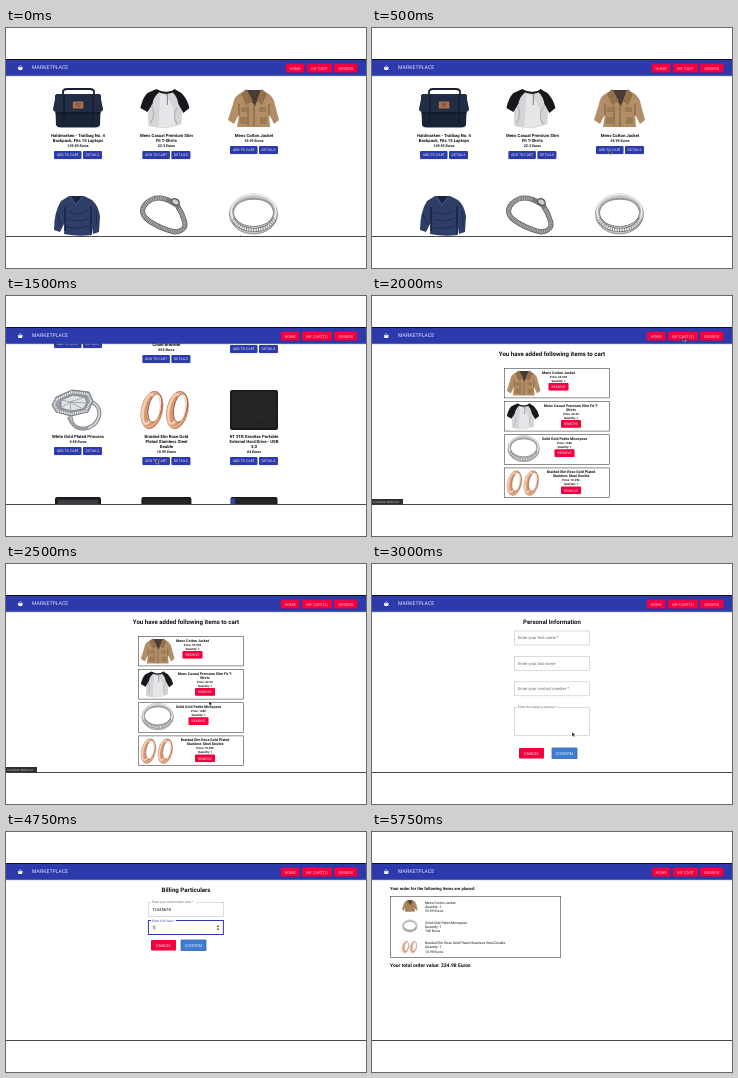
Animation, 360 px wide and 240 px high, one loop 6 s. Source, as an HTML page:

```html
<!DOCTYPE html>
<html lang="en">
<head>
<meta charset="utf-8">
<title>Marketplace</title>
<style>
  html, body { margin: 0; width: 100%; height: 100%; overflow: hidden; background: #fff; }
  svg { display: block; width: 100%; height: 100%; }
  text { font-family: Roboto, Arial, sans-serif; text-rendering: geometricPrecision; }
</style>
</head>
<body>
<svg id="stage" viewBox="0 0 360 240"></svg>
<script>
const INDIGO = '#2d3aac', RED = '#f5003f', BLUE = '#3f7dd0', AUTOFILL = '#e3ebfc', GRAY = '#c4c4c4';
const STEP = 250;

// ---- drawing helpers ----
const rect = (x, y, w, h, fill, extra = '') =>
  `<rect x="${x}" y="${y}" width="${w}" height="${h}" fill="${fill}" ${extra}/>`;
const path = (d, fill, stroke = 'none', width = .6) =>
  `<path d="${d}" fill="${fill}" stroke="${stroke}" stroke-width="${width}"/>`;
const ellipse = (x, y, rx, ry, stroke, width, turn = 0, fill = 'none') =>
  `<ellipse cx="${x}" cy="${y}" rx="${rx}" ry="${ry}" fill="${fill}" stroke="${stroke}" stroke-width="${width}" transform="rotate(${turn} ${x} ${y})"/>`;
const dashed = (dashes, shape) => `<g stroke-dasharray="${dashes}">${shape}</g>`;
const frameBox = (x, y, w, h, color, width = .6, fill = 'none') =>
  rect(x, y, w, h, fill, `stroke="${color}" stroke-width="${width}"`);

// y is the vertical middle of the capitals
function text(s, x, y, size, { weight = 400, color = '#111', anchor = 'start', extra = '' } = {}) {
  return `<text x="${x}" y="${y + size * .355}" font-size="${size}" font-weight="${weight}" fill="${color}" text-anchor="${anchor}" ${extra}>${s}</text>`;
}
const bold = (s, x, y, size, anchor = 'start', extra = '') =>
  text(s, x, y, size, { weight: 700, anchor, extra });
function button(s, x, y, w, h, fill, size, color = '#e4e4f6') {
  return rect(x, y + .4, w, h, '#0002', 'rx="1"') + rect(x, y, w, h, fill, 'rx="1"') +
    text(s, x + w / 2, y + h / 2, size, { color, anchor: 'middle' });
}

// ---- product pictures: x centred on 0, y from 0 to 40 ----
const drive = (w, accent = '') => rect(-w / 2, 0, w, 40, '#17181a', 'rx="2"') +
  rect(-w / 2 + 1.5, 1.5, w - 3, 36, '#232426', 'rx="1.5"') + accent;
const hoop = (x, turn) => ellipse(x, 20, 10.5, 19, '#a8633f', .6, turn, '#d9976f') +
  ellipse(x - 3, 19, 5.5, 15, '#f3d3bd', 2.4, turn) +
  ellipse(x + 3, 18, 6.5, 14.5, '#8f4f30', .8, turn, '#fff') +
  ellipse(x - 1, 20, 9, 17.5, '#f0c3a5', .9, turn);

const art = {
  backpack: () => path('M-15 6V2Q-14 0-11 0H12Q15 0 16 2V6', 'none', '#18202f', 1.8) +
    path('M-23 6H23L22 36Q21 38.5 17 38.5H-17Q-21 38.5-22 36Z', '#1a2437') +
    path('M-22 5H22L25 20Q25 23 21 23H-21Q-25 23-25 20Z', '#212d44') +
    path('M-14 6V34M15 6V34', 'none', '#141c2c', 1.4) +
    path('M-23 24H23', 'none', '#0e1523', 1.2) +
    rect(-5.2, 12.5, 10.6, 7, '#a9704a', 'rx=".5"') + path('M-3 15H3M-2 17H2', 'none', '#5b3823', .7),
  shirt: () => path('M-12 1Q0 4 10 1L16 9 15 35Q0 42-18 37L-19 9Z', '#d4d5d7') +
    path('M-6 5Q8 8 9 36Q4 39-8 38Z', '#e6e6e8') +
    path('M-10 0L-19 4Q-24 9-26 19L-19 23-14 15Q-13 8-7 3ZM8 0L15 4Q21 10 23 19L17 24 12 15Q11 8 6 3Z', '#17181b') +
    path('M-10 1Q0 7 9 1', 'none', '#17181b', 2) + path('M1 5V16', 'none', '#77787b', .9) +
    path('M-15 16Q-10 26-16 34M11 18Q5 28 11 35', 'none', '#b2b3b7', 1.2),
  jacket: () => path('M-8 1L8 1 15 5Q20 9 21 16L25 31 20 35 15 25 16 38-17 38-15 25-20 35-26 31-21 15Q-20 8-15 5Z', '#b18e67') +
    path('M-7 1H7L3 12 1 17-3 12Z', '#493b35') +
    path('M-8 0L-1 12-8 16-13 5ZM8 0L3 12 8 16 13 5Z', '#927049') +
    path('M-15 15L-15 27M15 15L15 27M0 14V38M-6 17V37', 'none', '#79593a', .9) +
    rect(-13, 18, 6, 5, '#9c7a52') + rect(5, 18, 7, 5, '#9c7a52') +
    rect(-14, 28, 7, 7, '#9c7a52') + rect(6, 28, 7, 7, '#9c7a52'),
  sweater: () => path('M-9 0L6 0 14 4Q20 9 22 20L21 36 15 38 13 25 14 39Q0 41-14 38L-13 26-18 36-24 34Q-24 16-17 5Z', '#2d3f66') +
    path('M-7 0L-2 8 4 0Z', '#18233f') + path('M-8 0L-2 9 5 0', 'none', '#3d5280', 1.2) +
    path('M-13 11V35M13 10V37', 'none', '#18233f', 1.6) +
    path('M-10 16Q0 20 10 15M-10 23Q1 27 11 22M-11 31Q0 34 11 30M-21 18L-17 28M18 14L19 30', 'none', '#202f52', 1.2),
  bracelet: () => {
    const chain = 'M7 7Q-9-3-20 7Q-30 18-14 27Q-2 34 9 36Q21 34 18 25Q16 17 11 10';
    return path(chain, 'none', '#57595c', 5) + path(chain, 'none', '#b3b4b6', 3.4) +
      dashed('.8 1', path(chain, 'none', '#6c6e71', 3.4)) +
      path('M0 3L13 11', 'none', '#77797c', 4.5) + ellipse(9, 6, 4, 3, '#55575a', 1.4, 30, '#ccc');
  },
  band: () => ellipse(-.5, 18, 24, 20, '#85878a', .8, 0, '#c3c4c6') +
    ellipse(-.5, 15.5, 22.5, 17, '#f0f0f1', 1.4) +
    ellipse(-.5, 16.5, 20, 14, '#77797c', .9, 0, '#fff') +
    path('M-21 16Q-18 3 0 3Q18 3 20 16', 'none', '#96989b', 1.6) +
    path('M-22 22Q-15 34 0 34Q15 34 21 22', 'none', '#77797c', 4.2) +
    dashed('1.6 .8', path('M-22 22Q-15 34 0 34Q15 34 21 22', 'none', '#efeff0', 2.6)),
  diamond: () => ellipse(7, 25, 15, 13, '#8a8d92', 4, -35) + ellipse(7, 25, 15, 13, '#d2d4d8', 1.8, -35) +
    path('M-10 27Q-4 42 10 38', 'none', '#9a9da2', 2.4) +
    path('M-22 7L-6 0 11 2 15 11 10 22-7 26-22 22-26 15Z', '#9a9da3', '#70747a', .9) +
    dashed('1.2 1', path('M-21 9L-6 2 10 4 13 11 8 21-7 24-20 21-24 15Z', 'none', '#eef0f2', 2)) +
    path('M-17 10L-5 5 7 7 9 13 5 19-7 21-17 18Z', '#dfe2e6', '#7b7f86', .9) +
    path('M-17 10L-8 12 7 7M-8 12L-7 21M-8 12L9 13M-17 18L-8 12L5 19', 'none', '#92969d', .8),
  rose: () => hoop(-14.5, 12) + hoop(11, 12),
  slab: () => drive(48, path('M-22 31L22 25', 'none', '#2e2f31', .7)),
  ssd: () => drive(46, rect(-20, 3, 40, 34, '#3b3c3f')),
  black: () => drive(50),
  console: () => drive(47, path('M-23 2L-19 1V39H-23Z', '#2b48b8')),
};
const picture = (name, x, y, scale = 1) =>
  `<g transform="translate(${x} ${y}) scale(${scale})">${art[name]()}</g>`;

// ---- data ----
const ROSE = 'Braided Elm Rose Gold Plated';
const products = [
  ['backpack', '109.95', 'Haldmarken - Trailbag No. 4', 'Backpack, Fits 15 Laptops'],
  ['shirt', '22.3', 'Mens Casual Premium Slim', 'Fit T-Shirts'],
  ['jacket', '55.99', 'Mens Cotton Jacket'],
  ['sweater', '15.99', 'Mens Casual Slim Fit'],
  ['bracelet', '695', 'Womens Classic Series', 'Gold &amp; Silver Woven', 'Station Long', 'Chain Bracelet'],
  ['band', '168', 'Solid Gold Petite', 'Micropave'],
  ['diamond', '9.99', 'White Gold Plated Princess'],
  ['rose', '10.99', 'Braided Elm Rose Gold', 'Plated Stainless Steel', 'Double'],
  ['slab', '64', 'KT 2TB Granites Portable', 'External Hard Drive - USB', '3.0'],
  ['ssd', '109', 'Portable Drive 1TB'],
  ['black', '109', 'Solid State Drive 256GB'],
  ['console', '114', 'Gaming Drive 4TB'],
];
const cartItems = [
  ['jacket', '55.99', 186.5, 'Mens Cotton Jacket'],
  ['shirt', '22.3', 199, 'Mens Casual Premium Slim Fit T-', 'Shirts'],
  ['band', '168', 192.5, 'Solid Gold Petite Micropave'],
  ['rose', '10.99', 199, ROSE, 'Stainless Steel Double'],
];
const withoutShirt = cartItems.filter(([name]) => name !== 'shirt');

// ---- pages ----
function shop(scroll) {
  return products.map(([name, price, ...lines], i) => {
    const x = [72, 160.4, 248][i % 3];
    const top = 62 + Math.floor(i / 3) * 107 - scroll;
    if (top > 210 || top < -80) return '';
    const y = top + 45 + (lines.length - 1) * 5;
    return picture(name, x, top - 1) +
      lines.map((s, n) => bold(s, x, top + 45 + n * 5, 4.27, 'middle')).join('') +
      bold(price + ' Euros', x, y + 5.8, 3.7, 'middle', 'font-style="italic"') +
      button('ADD TO CART', x - 24, y + 11, 27.5, 8, INDIGO, 3.6) +
      button('DETAILS', x + 5, y + 11, 19, 8, INDIGO, 3.6);
  }).join('');
}

function cart(items) {
  return bold('You have added following items to cart', 180, 58, 6.1, 'middle') +
    items.map(([name, price, x, ...lines], i) => {
      const top = 72.3 + i * 33.2, y = top + lines.length * 4;
      return frameBox(132.3, top, 105, 29.6, '#444') + picture(name, 152, top + 2, .66) +
        lines.map((s, n) => bold(s, x, top + 4 + n * 4, 3.65, 'middle')).join('') +
        bold(`Price: ${price}€`, x, y + 4.3, 2.9, 'middle') +
        bold('Quantity: 1', x, y + 8.5, 2.9, 'middle') +
        button('REMOVE', x - 10, y + 10.6, 20, 7.6, RED, 3.5);
    }).join('');
}

// Outlined field: the label sits on the border once the field is filled or focused
function field(label, value, y, { focus, error, auto } = {}) {
  const border = error ? '#e0263c' : focus ? INDIGO : GRAY;
  const raised = value || focus;
  return frameBox(142.4, y, 75, 14, border, focus || error ? 1 : .6, auto ? AUTOFILL : '#fff') +
    (raised ? rect(145, y - 1, label.length * 1.5 + 1, 2, '#fff') : '') +
    text(label, 146, raised ? y : y + 7, raised ? 3.1 : 4.1, { color: focus ? INDIGO : '#666' }) +
    text(value, 146, y + 7, 4.2) +
    (focus && !auto ? rect(146.4 + value.length * 2.35, y + 4.6, .4, 5, '#111') : '');
}
const actions = (x, gap, y) => button('CANCEL', x, y, 25, 10.4, RED, 4) +
  button('CONFIRM', x + gap, y, 25, 10.4, BLUE, 4) +
  frameBox(x + gap, y, 25, 10.4, '#2b5ea8', .7);

function details(stage) {
  const filled = stage >= 2, phone = ['', '', '', '1234', '12345678'][stage];
  const name = ['', 'Lav', 'Lavani Teron'][Math.min(stage, 2)];
  return field('Enter your first name *', name, 67, { focus: stage === 1 || stage === 2, auto: filled }) +
    bold('Personal Information', 180, 58, 6.1, 'middle') +
    field('Enter your last name', '', 92.5) +
    field('Enter your contact number *', phone, 117.8, { error: stage === 2, focus: stage === 3 }) +
    frameBox(142.4, 143.3, 75, 28, GRAY) + rect(145, 142, 40, 3, '#fff') +
    text('Enter the shipping address *', 146, 143.3, 3.1, { color: '#666' }) +
    (filled ? rect(145.5, 148, 69, 19, AUTOFILL) + text('Velmarek', 146, 150.5, 4) + text('4', 146, 155, 4) : '') +
    actions(147, 33, 184);
}

function billing(filled) {
  return bold('Billing Particulars', 180, 58, 6.1, 'middle') +
    field('Enter your card number here *', filled ? '12345678' : '', 70.3, { focus: !filled }) +
    field('Enter CVV here *', filled ? '1' : '', 88.5, { focus: filled }) +
    (filled ? path('M210.5 95L212 93 213.5 95ZM210.5 96.4L212 98.4 213.5 96.4Z', '#555') : '') +
    actions(145, 30, 108);
}

function order() {
  const names = ['Mens Cotton Jacket', 'Solid Gold Petite Micropave', ROSE + ' Stainless Steel Double'];
  return bold('Your order for the following items are placed:', 18, 57, 4.2) +
    frameBox(18.3, 64.6, 170.4, 61, '#444') +
    withoutShirt.map(([name, price], i) => {
      const y = 70.3 + i * 20.4;
      return picture(name, 38, y - 2.3, .31) +
        [names[i], 'Quantity: 1', price + ' Euros'].map((s, n) => text(s, 53, y + n * 4.1, 3.45)).join('');
    }).join('') +
    bold('Your total order value: 234.98 Euros', 18, 133.3, 5);
}

function header(count) {
  const wide = count ? 5 : 0;
  const link = (s, x, w) => button(s, x, 35.8, w, 8.8, RED, 4, '#ffb9c6');
  return rect(0, 47.5, 360, 1.2, '#0002') + rect(0, 31, 360, 16.8, INDIGO) + rect(0, 31, 360, 1, '#111') +
    path('M11.8 39.2H16.8L16 42H12.6Z', '#fff') + path('M12.8 39.2L14.3 37.3 15.8 39.2', 'none', '#fff', .5) +
    text('MARKETPLACE', 26, 39.6, 5.2, { color: '#dfe2f6' }) +
    link('HOME', 279.8 - wide, 18.6) +
    link(count ? `MY CART(${count})` : 'MY CART', 301 - wide, 25 + wide) +
    link('ORDERS', 328, 23.4);
}
const footer = link => rect(0, 208.8, 360, 32, '#fff') + rect(0, 208, 360, 1, '#4a4a4a') +
  (link ? rect(0, 203, 31, 5.6, '#2f3033') + text('localhost:3000/' + link, 1.5, 205.8, 2.9, { color: '#ccc' }) : '');
const pointer = (x, y) => `<g transform="translate(${x} ${y})">` +
  path('M0 0V4.4L1.1 3.5 1.8 5 2.6 4.6 1.9 3.2 3.2 3.1Z', '#111', '#fff', .35) + '</g>';

// ---- timeline: page, cursor x, cursor y, cart count, hovered link ----
const at = (page, x, y, count = 0, link = '') => ({ page, x, y, count, link });
const top0 = () => shop(0), row3 = () => shop(181), full = () => cart(cartItems);
const timeline = [
  at(top0, 234, 207), at(top0, 236, 165), at(top0, 237, 122),
  at(top0, 148, 126, 1), at(top0, 148, 126, 2), at(() => shop(107), 237, 126, 2),
  at(row3, 150, 163.5, 3), at(row3, 311, 41, 4, 'cart'),
  at(full, 311, 41, 4, 'cart'), at(full, 260, 90, 4, 'cart'), at(full, 203, 137, 4, 'cart'),
  at(() => cart(withoutShirt), 200, 128, 3),
  at(() => details(0), 200, 168, 3), at(() => details(0), 186, 77, 3), at(() => details(1), 186, 77, 3),
  at(() => details(2), 191, 186, 3), at(() => details(3), 186, 126, 3), at(() => details(4), 191, 188, 3),
  at(() => billing(false), 191, 188, 3), at(() => billing(true), null, 0, 3),
  at(order, 189, 113), at(order, 339, 41, 0, 'orders'), at(order, 339, 41, 0, 'orders'), at(order, null, 0),
];

const stage = document.getElementById('stage');
let shown = -1;
function tick() {
  const index = Math.floor(performance.now() / STEP) % timeline.length;
  if (index !== shown) {
    shown = index;
    const { page, x, y, count, link } = timeline[index];
    stage.innerHTML = rect(0, 0, 360, 240, '#fff') + page() + rect(0, 0, 360, 31, '#fff') +
      header(count) + (x === null ? '' : pointer(x, y)) + footer(link);
  }
  requestAnimationFrame(tick);
}
tick();
</script>
</body>
</html>
```
